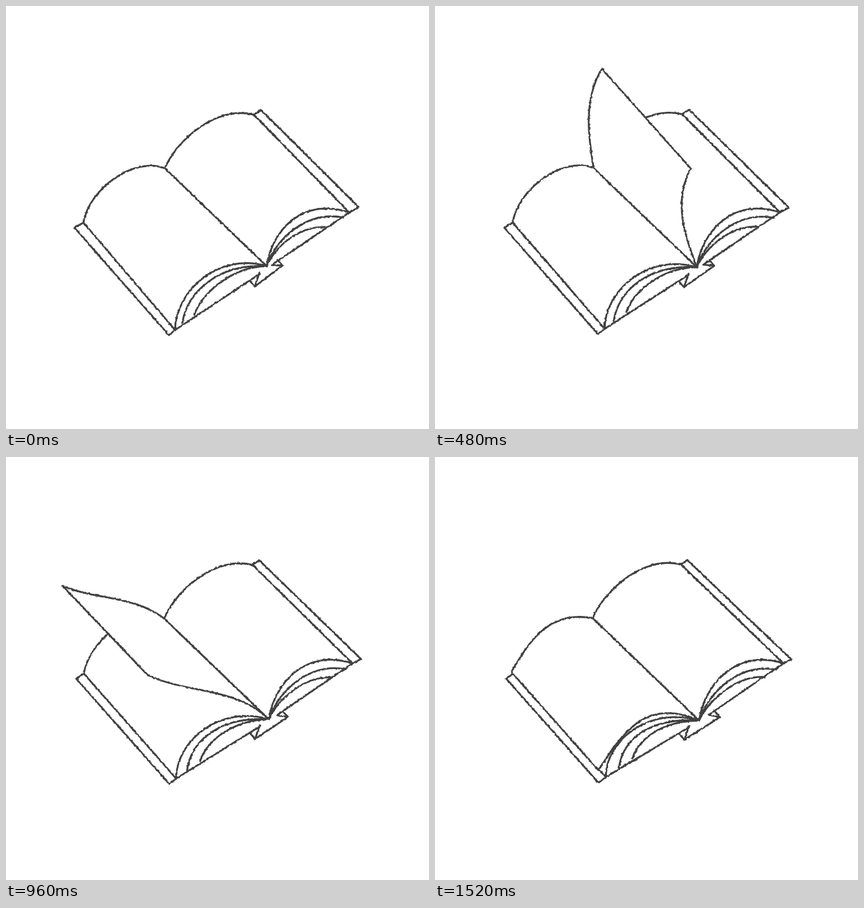
An HTML page for the animation above (1.6 s loop, 748 by 748 pixels).

```html
<!DOCTYPE html>
<html lang="en">
<head>
<meta charset="utf-8">
<title>Turning page</title>
<style>
  html, body { margin: 0; width: 100%; height: 100%; overflow: hidden; background: #fff; }
  svg { display: block; width: 100%; height: 100%; }
  path { fill: none; stroke: #404041; stroke-width: 3.3; stroke-linecap: round; stroke-linejoin: round; }
  #sheet { fill: #fff; stroke: none; }
</style>
</head>
<body>
<svg viewBox="0 0 748 748">
  <filter id="pencil" x="0" y="0" width="748" height="748" filterUnits="userSpaceOnUse" color-interpolation-filters="sRGB">
    <feTurbulence id="grain" type="fractalNoise" baseFrequency="0.22" numOctaves="2" result="n"/>
    <feDisplacementMap in="SourceGraphic" in2="n" scale="3.4" xChannelSelector="R" yChannelSelector="G"/>
  </filter>
  <g filter="url(#pencil)">
    <path id="book"/>
    <path id="arc" pathLength="100"/>
    <path id="sheet"/>
    <path id="rim"/>
    <path id="spine"/>
  </g>
</svg>
<script>
const STEP = 80, FRAMES = 20, LAST = FRAMES - 1;
const $ = id => document.getElementById(id);
const add = (p, x, y) => [p[0] + x, p[1] + y];

// Book corners: start point and slow drift over one loop
const corners = {
  leftOut:  [121, 392, 5, 0],
  leftIn:   [137, 383, 1, 0],
  footOut:  [288, 582, 1, -6],
  footIn:   [299, 573, 3, -7],
  top:      [281, 287, -2, -2],
  hinge:    [461, 460, 6, 6],
  rightIn:  [438, 192, -3, -2],
  rightOut: [451, 184, -5, -2],
  endOut:   [624, 356, 6, 2],
  endIn:    [607, 365, 9, 0],
  tip:      [489, 459, 15, 1],
  notch:    [470, 458, 14, -2],
  base:     [440, 496, 1, 4],
  leafL1:   [312, 560, 13, -10],
  leafL2:   [333, 546, 16, -13],
  leafR1:   [597, 374, 6, 2],
  leafR2:   [568, 391, 15, -2]
};

// Turning sheet: step, far corner, near corner, bend at the root and at the rim
const poses = [
  [0,  438, 191, 607, 364,  .20,  .28],
  [4,  358, 160, 512, 320,  .17,  .35],
  [6,  295, 111, 452, 287,  .08,  .16],
  [8,  226, 127, 391, 290, -.05, -.05],
  [10, 159, 164, 295, 280, -.06, -.06],
  [12, 100, 228, 250, 385, -.12,  .03],
  [14, 110, 291, 253, 448, -.17,  .13],
  [16, 105, 319, 238, 475, -.20,  .24],
  [19, 135, 380, 289, 554, -.32, -.16]
];

// Smooth interpolation through the poses
function poseAt(t) {
  let i = 0;
  while (i < poses.length - 2 && t >= poses[i + 1][0]) i++;
  const [p, q] = [poses[i], poses[i + 1]];
  const before = poses[i - 1] || p, after = poses[i + 2] || q;
  const h = q[0] - p[0], u = (t - p[0]) / h, w = u * u * (3 - 2 * u);
  const slope = (a, b, c) => (b[c] - a[c]) / (b[0] - a[0]);
  return p.map((v, c) => v + (q[c] - v) * w
    + h * u * (1 - u) * ((1 - u) * slope(before, q, c) - u * slope(p, after, c)));
}

const line = (...pts) => 'M' + pts.join('L');
const curve = (a, c, d, b) => `M${a}C${c} ${d} ${b}`;

// Curve from a to b whose handles are pushed sideways by m and n chord lengths
function bent(a, b, m, n) {
  const x = b[0] - a[0], y = b[1] - a[1];
  return curve(a, add(a, x / 3 + y * m, y / 3 - x * m), add(a, x * 2 / 3 + y * n, y * 2 / 3 - x * n), b);
}

function drawBook(b, f) {
  const { top, hinge, leftIn, rightIn, footIn, endIn, base, tip } = b;
  $('book').setAttribute('d', [
    line(leftIn, b.leftOut, b.footOut, footIn, add(base, 8, -22)),
    line(leftIn, footIn),
    line(rightIn, b.rightOut, b.endOut, endIn, b.notch, tip, base, add(base, 8, -24)),
    line(rightIn, endIn),
    line(add(base, -9, -10), base),
    line(add(tip, -9, -10), tip),
    curve(top, add(top, 18, -46), add(rightIn, -68, -17), rightIn),
    curve(footIn, add(footIn, 0, -65), add(hinge, -89, -26), hinge),
    curve(b.leafL1, add(b.leafL1, 8, -55), add(hinge, -84, -5), hinge),
    curve(b.leafL2, add(b.leafL2, 14, -40), add(hinge, -60, 1), hinge),
    curve(hinge, add(hinge, 10, -66), add(endIn, -81, -27), endIn),
    curve(hinge, add(hinge, 17, -51), add(b.leafR1, -64, -12), b.leafR1),
    curve(hinge, add(hinge, 17, -37), add(b.leafR2, -49, -3), b.leafR2)
  ].join(''));

  // The landing sheet gradually hides the left arc
  const arc = $('arc'), visible = f < 12 ? 100 : 6.4 * (LAST - f);
  arc.setAttribute('d', curve(leftIn, add(leftIn, 10, -60), add(top, -55, -21), top));
  arc.setAttribute('stroke-dasharray', visible + ' 200');
  $('spine').setAttribute('d', line(top, hinge));
}

function drawSheet({ top, hinge }, f) {
  let d = '';
  if (f > 0) {
    const [, x, y, nx, ny, root, rim] = poseAt(f);
    const far = bent(top, [x, y], root, rim);
    const near = bent([nx, ny], hinge, -rim * 1.25, -root * 1.25);
    d = far + near.replace('M', 'L');
  }
  $('sheet').setAttribute('d', d && d + 'Z');
  $('rim').setAttribute('d', d);
}

let shown = -1;
function draw(now) {
  const f = Math.floor(now / STEP) % FRAMES;
  if (f !== shown) {
    shown = f;
    const b = {};
    for (const k in corners) {
      const [x, y, dx, dy] = corners[k];
      b[k] = [x + dx * f / LAST, y + dy * f / LAST];
    }
    drawBook(b, f);
    drawSheet(b, f);
    $('grain').setAttribute('seed', f + 1);
  }
  requestAnimationFrame(draw);
}
draw(performance.now());
</script>
</body>
</html>
```
